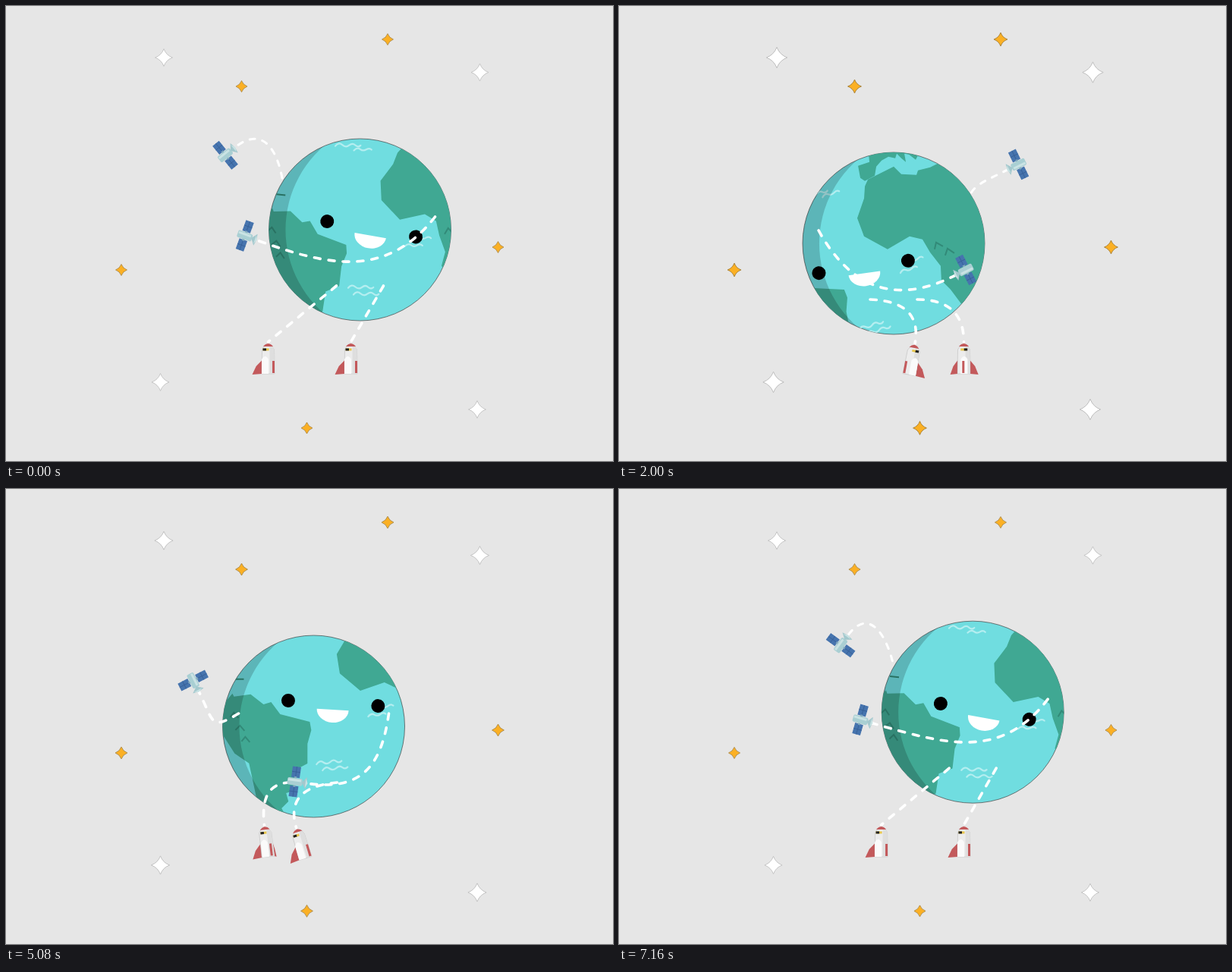
Recreate the animation shown at these times as an HTML page. Size 800 by 600 pixels, loop 7.2 s.

```html
<!DOCTYPE html>
<html lang="en">
<head>
<meta charset="utf-8">
<title>Dancing planet</title>
<style>
  html, body { margin: 0; width: 100%; height: 100%; overflow: hidden; background: #e6e6e6; }
  svg { display: block; width: 800px; height: 600px; }
  .land { fill: #40a893; }
  .ridge { fill: none; stroke: #328a78; stroke-width: 2; }
  .wave { fill: none; stroke: #b4eef0; stroke-width: 2.2; stroke-linecap: round; }
  .limb { fill: none; stroke: #fff; stroke-width: 3.6; stroke-linecap: round; stroke-dasharray: 8 11; }
  #back .limb { stroke-width: 3; stroke-dasharray: 7 10; }
  .red { fill: #c3595b; }
</style>
</head>
<body>
<svg viewBox="0 0 800 600">
  <defs>
    <clipPath id="disc"><circle r="120"/></clipPath>
    <path id="wave" class="wave" d="M0 0q4-6 9-2.500t9-.5t8-1t7-.5"/>
    <path id="ripple" class="wave" d="M0 0q4-5 8-2.500t8-.5t7-.5"/>
    <path id="spark" d="M0-1Q.27-.27 1 0Q.27.27 0 1Q-.27.27-1 0Q-.27-.27 0-1Z"/>
    <g id="satellite">
      <path d="M-5.500-20h11v14.500h-11zM-5.500 5.500h11v14.500h-11z" fill="#4674ae"/>
      <path d="M0-20v14M0 6v14M-5.500-13h11M-5.500 13h11" stroke="#365f96" stroke-width=".8"/>
      <rect x="-1.500" y="-7" width="3" height="14" fill="#7fa6bd"/>
      <rect x="-10" y="-4.800" width="20" height="9.600" rx="2" fill="#a9cfd3"/>
      <rect x="-9" y="-3.500" width="17" height="3" fill="#cae3e4"/>
      <path d="M9 0L15-8Q17 0 15 8Z" fill="#a3c8cd"/>
      <path d="M14-6l3 6l-3 6z" fill="#c8e2e3"/>
    </g>
  </defs>
  <g id="stars"></g>
  <g id="back"></g>
  <g id="planet">
    <circle r="120" fill="#70dde0" stroke="#444" stroke-width=".7"/>
    <g clip-path="url(#disc)">
      <g class="turn">
        <g transform="rotate(8) translate(-322.250 -344.300)">
          <path class="land" d="M328 229L362 212L372 222L392 223L394 217L410 213L422 207L430 212L468 249L500 270V380L470 402L452 394L437 374L425 362L424 343L410 325L400 308L383 304L354 321L323 304L314 280L323 254L324 238Z"/>
          <path class="land" d="M315 211L330 206L329 196L345 185H400L391 203L382 196L376 195L378 206L372 201L366 195L364 201L355 199L346 204L339 212L337 224L324 231L318 227Z"/>
          <path class="ridge" d="M416 321L418 312L427 317M430 329L433 320L442 326"/>
        </g>
        <g transform="rotate(-3.400) translate(-431.750 -282.500)">
          <path class="land" d="M260 292L288 283L299 270L301 274L323 271L340 284L350 281L362 297L401 307L403 318L398 336V362L381 371L380 398L370 401L373 412L364 421L370 432L348 424L331 408L326 385L321 362L302 349L288 327L260 310Z"/>
          <path class="ridge" d="M296 301L301 295L307 302M303 318L309 312L315 319M311 333L316 327L322 334M302 251H314"/>
          <use href="#wave" x="410" y="363"/>
          <use href="#wave" x="418" y="371"/>
          <use href="#ripple" x="478" y="300"/>
          <use href="#ripple" x="488" y="289"/>
          <use href="#wave" x="372" y="179"/>
          <use href="#ripple" x="397" y="182"/>
        </g>
      </g>
      <path d="M-130-122H-32A145.700 145.700 0 0 0-32 122H-130Z" fill="#000" opacity=".18"/>
      <g class="turn">
        <circle cx="-59.300" r="9"/>
        <circle cx="59.300" r="9"/>
        <path d="M-21 8.500H21A21 17 0 0 1-21 8.500Z" fill="#fff"/>
      </g>
    </g>
  </g>
  <g id="legs"></g>
  <g id="front"></g>
</svg>
<script>
const LOOP = 7200, BEAT = 1200, STEP = 40, TAU = 2 * Math.PI;
const { sin, cos } = Math;
const $ = id => document.getElementById(id);
const rad = deg => deg * Math.PI / 180;
const clamp = (v, lo, hi) => Math.min(hi, Math.max(lo, v));
const mix = (a, b, u) => a + (b - a) * u;
const along = ([x, y], deg, d) => [x + d * cos(rad(deg)), y + d * sin(rad(deg))];

// 0 to 1 between two times, and a bump that rises and falls between them.
function ease(t, from, to) {
  const u = clamp((t - from) / (to - from), 0, 1);
  return u * u * (3 - 2 * u);
}
const bump = (t, from, to) => sin(Math.PI * clamp((t - from) / (to - from), 0, 1)) ** 3;

function add(parent, tag, attrs = {}) {
  const el = document.createElementNS('http://www.w3.org/2000/svg', tag);
  set(el, attrs);
  return parent.appendChild(el);
}
function set(el, attrs) {
  for (const name in attrs) el.setAttribute(name, attrs[name]);
}

// Smooth periodic interpolation through rows of [time, ...values], without overshoot.
function track(rows, period) {
  const n = rows.length;
  const row = i => rows[(i + n) % n];
  const time = i => row(i)[0] + Math.floor(i / n) * period;
  const rate = (i, k) => (row(i + 1)[k] - row(i)[k]) / (time(i + 1) - time(i));
  const slope = (i, k) => {
    const a = rate(i - 1, k), b = rate(i, k);
    return a * b <= 0 ? 0 : 2 * a * b / (a + b);
  };
  return t => {
    let i = n - 1;
    while (rows[i][0] > t) i--;
    const d = time(i + 1) - time(i), u = (t - time(i)) / d, v = 1 - u;
    return rows[i].slice(1).map((a, j) => {
      const k = j + 1;
      return a * v * v * (1 + 2 * u) + row(i + 1)[k] * u * u * (3 - 2 * u)
        + d * u * v * (v * slope(i, k) - u * slope(i + 1, k));
    });
  };
}

// The sway mirrors itself after half a beat, so it holds odd harmonics only.
function body(t) {
  const w = t / BEAT * TAU;
  const sway = (a, b, c, d) => a * cos(w) + b * sin(w) + c * cos(3 * w) + d * sin(3 * w);
  return {
    x: 400 + sway(71.4, -3, -4.9, .5),
    y: 304.4 - 8.6 * cos(2 * w) + 4.5 * sin(2 * w) - .8 * cos(4 * w),
    tilt: sway(11.2, 1.2, -1.3, -.75),
    look: sway(26, 10.4, -11, -2.6),
    dip: -.8 + 31.8 * ease(t, 0, 600) - 61.5 * ease(t, 4200, 4800) + 29.7 * ease(t, 6500, 7120)
  };
}

// Arm swing about the shoulder: angle, reach, and how the satellite is turned.
const SPIN = 360 / BEAT;
const swing = track([
  [0, 226, 113, -39], [200, 233, 109, 26], [280, 216, 74, 63], [480, 10.6, 228, 163],
  [600, 5.7, 252, 160], [800, 15, 201, 153], [880, 36, 153, 172], [1080, 213, 76, 272]
].map(([t, angle, reach, heading]) => [t, angle, reach, heading - SPIN * t]), BEAT);

const yaws = [
  w => clamp(-2 * cos(w - rad(15)), -1, 1),
  w => clamp(-.9 - 2 * cos(w), -1, 1)
];

const white = [[208, 68], [624.5, 87.5], [203.5, 496], [621, 532]];
const gold = [[310.5, 106], [503, 44], [648.5, 318], [152, 348], [396.5, 556.5]];
const makeStars = (spots, size, fill, stroke) => spots.map(([x, y]) => ({
  x, y, size,
  el: add($('stars'), 'use', { href: '#spark', fill, stroke, 'stroke-width': .9 / size, 'stroke-linejoin': 'round' })
}));
const stars = [...makeStars(white, 12.7, '#fff', '#bbb'), ...makeStars(gold, 8.3, '#fbb024', '#a8833c')];

function makeRocket() {
  const g = add($('legs'), 'g');
  const left = add(g, 'path', { class: 'red' });
  const right = add(g, 'path', { class: 'red' });
  add(g, 'path', { d: 'M-8.500 0L-8-32Q-6-37 0-39Q6-37 8-32L8.500 0Z', fill: '#ececec', stroke: '#aaa', 'stroke-width': .4 });
  add(g, 'path', { d: 'M2-37Q6-36 8-32L8.500 0H2Z', fill: '#dedede' });
  const panel = add(g, 'path', { d: 'M-4.500 0V-19Q0-27 4.500-19V0Z', fill: '#fafafa' });
  const strip = add(g, 'rect', { class: 'red', y: -17, width: 3, height: 16 });
  add(g, 'path', { class: 'red', d: 'M-6.500-36Q-4-39.500 0-40Q4-39.500 6.500-36Z' });
  const visor = add(g, 'g');
  add(visor, 'rect', { x: -4.5, y: -33.5, width: 8, height: 3, fill: '#e8c64c' });
  const dark = add(visor, 'rect', { y: -33.5, width: 4.5, height: 3, fill: '#222' });
  return { g, left, right, panel, strip, visor, dark };
}

const sides = [0, 1].map(mirror => {
  const shin = add($('legs'), 'path', { class: 'limb' });
  const hand = add($('back'), 'g');
  return {
    mirror, shin, hand,
    rocket: makeRocket(),
    string: add(hand, 'path', { class: 'limb' }),
    sat: add(hand, 'use', { href: '#satellite' })
  };
});

function drawRocket(r, [x, y], tilt, yaw) {
  const fin = (dir, lean) => {
    const w = lean > 0 ? 11 + 2 * lean : 11 * (1 + lean);
    return `M${dir * 8}-18L${dir * (8 + w * .6)}-10L${dir * (8 + w)} 1L${dir * 8} 0Z`;
  };
  set(r.g, { transform: `translate(${x} ${y}) rotate(${tilt})` });
  set(r.left, { d: fin(-1, -yaw) });
  set(r.right, { d: fin(1, yaw) });
  set(r.strip, { x: -7 * yaw - 1.5 });
  set(r.panel, { transform: `translate(${4 * yaw} 0)` });
  set(r.visor, { transform: `translate(${2.5 * yaw} 0)` });
  set(r.dark, { x: yaw > 0 ? 0 : -4.5 });
}

function drawArm(s, p, b, sign) {
  const [angle, reach, turn] = swing(p);
  const face = deg => sign < 0 ? deg : 180 - deg;
  const heading = face(turn + SPIN * p);
  const shoulder = [b.x + sign * 99, b.y - 17];
  const hand = along(shoulder, face(angle), reach);
  const wrist = along(hand, heading, 16);

  // The string leaves the dish straight ahead and meets the shoulder at an angle.
  const pull = 25 + .33 * Math.hypot(wrist[0] - shoulder[0], wrist[1] - shoulder[1]);
  const elbow = face(angle + 46 - 113 * bump(p, 180, 380));
  set(s.string, { d: `M${shoulder}C${along(shoulder, elbow, pull)} ${along(wrist, heading, pull)} ${wrist}` });
  set(s.sat, { transform: `translate(${hand}) rotate(${heading})` });

  const layer = $(p > 240 && p < 980 ? 'front' : 'back');
  if (s.hand.parentNode !== layer) layer.append(s.hand);
}

function drawLeg(s, p, b, sign, yaw) {
  const stride = bump(p, 620, 1180);
  const tilt = -sign * (17 * stride - 8 * bump(p, 200, 400));
  const foot = [400 + sign * (54.5 - 61 * stride), 485 + 2 * stride];
  const hip = [b.x + sign * 31, b.y + 74];
  const top = along(foot, tilt - 90, 42);

  // The lower the planet, the more the knee bends over the rocket.
  const knee = along(foot, tilt - 90, 98), bent = clamp((b.y - 295) / 18, 0, 1);
  const pull = [0, 1].map(i => mix((hip[i] + top[i]) / 2, knee[i], bent));
  set(s.shin, { d: `M${hip}Q${pull} ${top}` });
  drawRocket(s.rocket, foot, tilt, yaw);
}

const turns = document.querySelectorAll('.turn');

function draw(t) {
  const b = body(t);
  set($('planet'), { transform: `translate(${b.x} ${b.y})` });
  for (const el of turns) set(el, { transform: `translate(${b.look - .22 * b.dip} ${b.dip}) rotate(${b.tilt})` });

  for (const s of sides) {
    const p = (t + BEAT / 2 * s.mirror) % BEAT, sign = s.mirror ? 1 : -1;
    drawArm(s, p, b, sign);
    drawLeg(s, p, b, sign, yaws[s.mirror](t / BEAT * TAU));
  }

  const pulse = 1 - .1 * cos(13 * TAU * t / LOOP);
  for (const { el, x, y, size } of stars) {
    set(el, { transform: `translate(${x} ${y}) scale(${size * pulse})` });
  }
}

const start = performance.now();
function frame() {
  const t = (performance.now() - start) % LOOP;
  draw(Math.floor(t / STEP) * STEP);
  requestAnimationFrame(frame);
}
draw(0);
requestAnimationFrame(frame);
</script>
</body>
</html>
```
